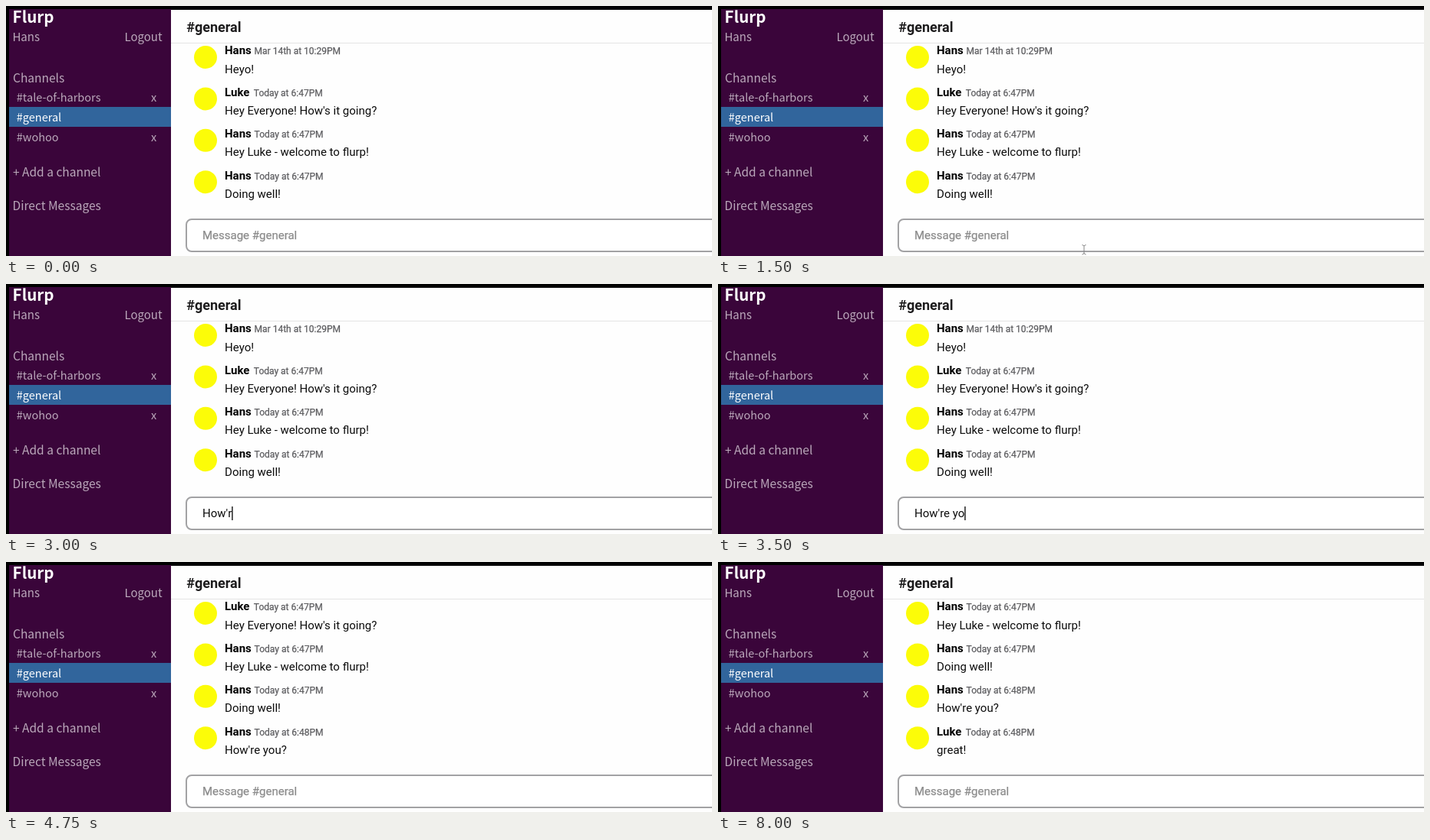
An HTML page for the animation above (10000 ms loop, 920 by 327 pixels).

```html
<!DOCTYPE html>
<html lang="en">
<head>
<meta charset="utf-8">
<title>Team chat</title>
<style>
  html, body { margin: 0; width: 100%; height: 100%; overflow: hidden; background: #000; }
  svg { display: block; width: 920px; height: 327px; }
  text { white-space: pre; }
  .side { font: 15.5px "Noto Sans CJK JP", "Noto Sans CJK SC", "Noto Sans CJK", "Open Sans", sans-serif; fill: #bba9bb; }
  .side .brand { font-size: 20.6px; font-weight: 700; fill: #fff; }
  .side .user { font-size: 15px; }
  .side .item { font-size: 14.5px; }
  .side .on { fill: #fff; }
  .chat { font: 15px Roboto, Arial, sans-serif; fill: #0c0c0c; }
  .head { font-size: 18px; font-weight: 700; fill: #1d1c1d; }
  .name { font-weight: 700; fill: #000; }
  .time { font-size: 12px; fill: #5c5c5f; stroke: #5c5c5f; stroke-width: .25px; }
  .hint { fill: #8b8b8b; stroke: #8b8b8b; stroke-width: .25px; }
</style>
</head>
<body>
<svg viewBox="0 0 920 327">
  <rect width="920" height="327" fill="#000"/>
  <rect x="4" y="4" width="211" height="323" fill="#3a053a"/>
  <rect x="4" y="132" width="211" height="26" fill="#31659c"/>
  <rect x="215" y="5" width="705" height="322" fill="#fefefe"/>
  <rect x="215" y="48" width="705" height="1" fill="#e4e4e4"/>

  <g class="side">
    <text class="brand" x="8.6" y="22">Flurp</text>
    <text class="user" x="8.4" y="46.3">Hans</text>
    <text class="user" x="203.6" y="46.3" text-anchor="end">Logout</text>
    <text x="9" y="99.6">Channels</text>
    <text class="item" x="13.8" y="125">#tale-of-harbors</text>
    <text class="item" x="189" y="125">x</text>
    <text class="item on" x="13.8" y="151">#general</text>
    <text class="item" x="13.8" y="177.3">#wohoo</text>
    <text class="item" x="189" y="177.3">x</text>
    <text x="9" y="222.5">+ Add a channel</text>
    <text x="8.6" y="267">Direct Messages</text>
  </g>

  <g class="chat">
    <text class="head" x="235.2" y="34">#general</text>
    <g id="log"></g>
    <rect x="235" y="279" width="720" height="42" rx="7" fill="#fff" stroke="#a2a2a4" stroke-width="2"/>
    <text id="hint" class="hint" x="256" y="305">Message #general</text>
    <text id="draft" x="256" y="305"></text>
    <rect id="caret" y="291" width="1.3" height="18" fill="#000"/>
  </g>

  <path id="beam" fill="none" stroke="#858585" d="M474.5 312.5q2 0 2.5 2q.5-2 2.5-2M477 315V323M474.5 325q2 0 2.5-2q.5 2 2.5 2"/>
</svg>
<script>
const LOOP = 10000;
const ROW = 54.4;
const $ = id => document.getElementById(id);

const messages = [
  ["Hans", "Mar 14th at 10:29PM", "Heyo!"],
  ["Luke", "Today at 6:47PM", "Hey Everyone! How's it going?"],
  ["Hans", "Today at 6:47PM", "Hey Luke - welcome to flurp!"],
  ["Hans", "Today at 6:47PM", "Doing well!"],
  ["Hans", "Today at 6:48PM", "How're you?"],
  ["Luke", "Today at 6:48PM", "great!"]
];

// [start, value] steps; each value holds until the next one
const drafts = [
  [0, ""], [2000, "H"], [2250, "Ho'"], [2750, "How"], [3000, "How'r"], [3250, "How're "],
  [3500, "How're yo"], [3750, "How're you"], [4000, "How're you?"], [4250, ""]
];
const carets = [[0, false], [2000, true], [4750, false], [5250, true], [5750, false]];
const firsts = [[0, 0], [4500, 1], [8000, 2]];
const beams = [[0, false], [500, true], [2750, false]];

const at = (steps, t) => steps.reduce((v, [start, next]) => t >= start ? next : v, steps[0][1]);
const show = (el, on) => el.setAttribute("visibility", on ? "visible" : "hidden");

const row = ([name, time, text], i) => `
  <g transform="translate(0 ${(i * ROW).toFixed(1)})">
    <circle cx="260" cy="67" r="15" fill="#fcfc08"/>
    <text class="name" x="285" y="63.4">${name}</text>
    <text class="time" x="${name === "Hans" ? 323.6 : 322.8}" y="63.4">${time}</text>
    <text x="285.1" y="87.6">${text}</text>
  </g>`;

let last = "";
function draw(t) {
  const draft = at(drafts, t), caret = at(carets, t);
  const first = at(firsts, t), beam = at(beams, t);
  const key = [draft, caret, first, beam].join("|");
  if (key === last) return;
  last = key;
  $("log").innerHTML = messages.slice(first, first + 4).map(row).join("");
  $("draft").textContent = draft;
  const end = draft ? $("draft").getComputedTextLength() : 0;
  $("caret").setAttribute("x", 256 + end);
  show($("hint"), !draft);
  show($("caret"), caret);
  show($("beam"), beam);
}

const start = performance.now();
function tick() {
  draw((performance.now() - start) % LOOP);
  requestAnimationFrame(tick);
}
tick();
</script>
</body>
</html>
```
